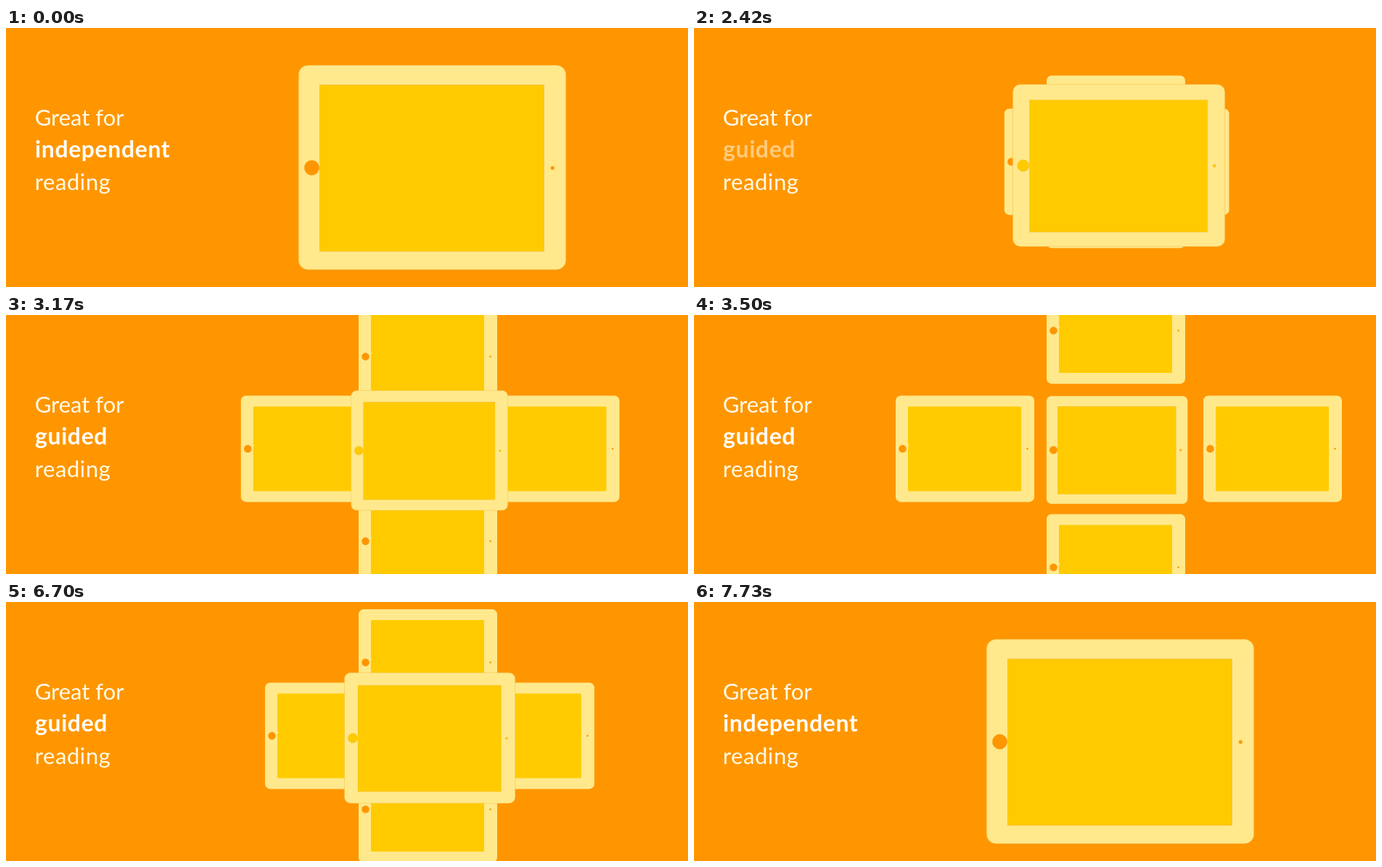
These frames come from a looping animation (940 px wide and 358 px high, 9.66 s). An HTML page:

```html
<!DOCTYPE html>
<html lang="en">
<head>
<meta charset="utf-8">
<title>Reading tablets</title>
<style>
  html, body { margin: 0; width: 100%; height: 100%; overflow: hidden; background: #ff9600; }
  svg { display: block; width: 100vw; height: 100vh; }
  text { font: 400 31px Lato, "Open Sans", sans-serif; letter-spacing: .6px; fill: #fffbe6; }
  .tight { letter-spacing: 0; }
  .word { font-weight: 700; font-size: 32px; fill: #fffef8; }
  .body { fill: #ffe98c; fill-rule: evenodd; }
  .screen { fill: #ffcb00; }
  .edge { stroke: #f0b43c; stroke-opacity: .6; stroke-width: 1; }
</style>
</head>
<body>
<svg viewBox="0 0 940 358">
  <defs>
    <g id="small">
      <path class="body"/>
      <rect class="screen" x="17" y="15" width="156" height="117" rx="1.5"/>
      <circle cx="17" cy="69" r="1.2" fill="#ffe98c"/>
    </g>
  </defs>
  <g id="others"></g>
  <g id="main">
    <path class="body edge"/>
    <rect class="screen edge" x="29.2" y="27.2" width="309" height="230"/>
  </g>
  <text x="39.7" y="134.5" class="tight">Great for</text>
  <text x="40" y="179" class="word" id="solo">independent</text>
  <text x="40" y="179" class="word" id="group">guided</text>
  <text x="39.7" y="224">reading</text>
</svg>
<script>
const LOOP = 9660, STEP = 30, STEPS = 50;
const W = 368.5, H = 282.5;
const START = [486, 111.4];
const MOVES = [[-208, 0], [216, 0], [0, -163.4], [0, 163.8]];
const $ = s => document.querySelector(s);
const lerp = (a, b, k) => a + (b - a) * k;
const clamp = k => Math.min(1, Math.max(0, k));

const roundRect = (w, h, r) =>
  `M${r} 0H${w - r}A${r} ${r} 0 0 1 ${w} ${r}V${h - r}A${r} ${r} 0 0 1 ${w - r} ${h}` +
  `H${r}A${r} ${r} 0 0 1 0 ${h - r}V${r}A${r} ${r} 0 0 1 ${r} 0Z`;
const hole = (x, y, r) =>
  `M${x - r} ${y}a${r} ${r} 0 1 0 ${2 * r} 0a${r} ${r} 0 1 0 ${-2 * r} 0Z`;

// Button and camera are cut out, so whatever lies behind shows through.
$('#small path').setAttribute('d',
  roundRect(191, 147, 7) + hole(9.5, 73.5, 5.3) + hole(181.5, 73.5, 1.3));
$('#main path').setAttribute('d',
  roundRect(W, H, 13) + hole(18.2, 141.6, 10.3) + hole(350.1, 141.9, 2.5));

const others = MOVES.map(() => {
  const use = document.createElementNS('http://www.w3.org/2000/svg', 'use');
  use.setAttribute('href', '#small');
  return $('#others').appendChild(use);
});

const ramp = (t, from) => clamp((Math.floor((t - from) / STEP) + 1) / STEPS);

function draw(t) {
  const p = ramp(t, 2030) - ramp(t, 6160);
  others.forEach((el, i) => {
    const [dx, dy] = MOVES[i];
    el.setAttribute('transform', `translate(${START[0] + dx * p} ${START[1] + dy * p})`);
  });

  // The middle tablet recedes, so its size falls off with distance.
  const k = 2 * p / (p + 1);
  const s = lerp(1, 194.5 / W, k);
  const x = lerp(587.5, 583.1, k) - W * s / 2;
  const y = lerp(192.8, 186.5, k) - H * s / 2;
  $('#main').setAttribute('transform', `translate(${x} ${y}) scale(${s})`);

  $('#solo').setAttribute('opacity', t < 1930 || t >= 7730 ? 1 : 0);
  $('#group').setAttribute('opacity', clamp(p / .56));
}

const begin = performance.now();
function tick() {
  draw((performance.now() - begin) % LOOP);
  requestAnimationFrame(tick);
}
draw(0);
requestAnimationFrame(tick);
</script>
</body>
</html>
```
